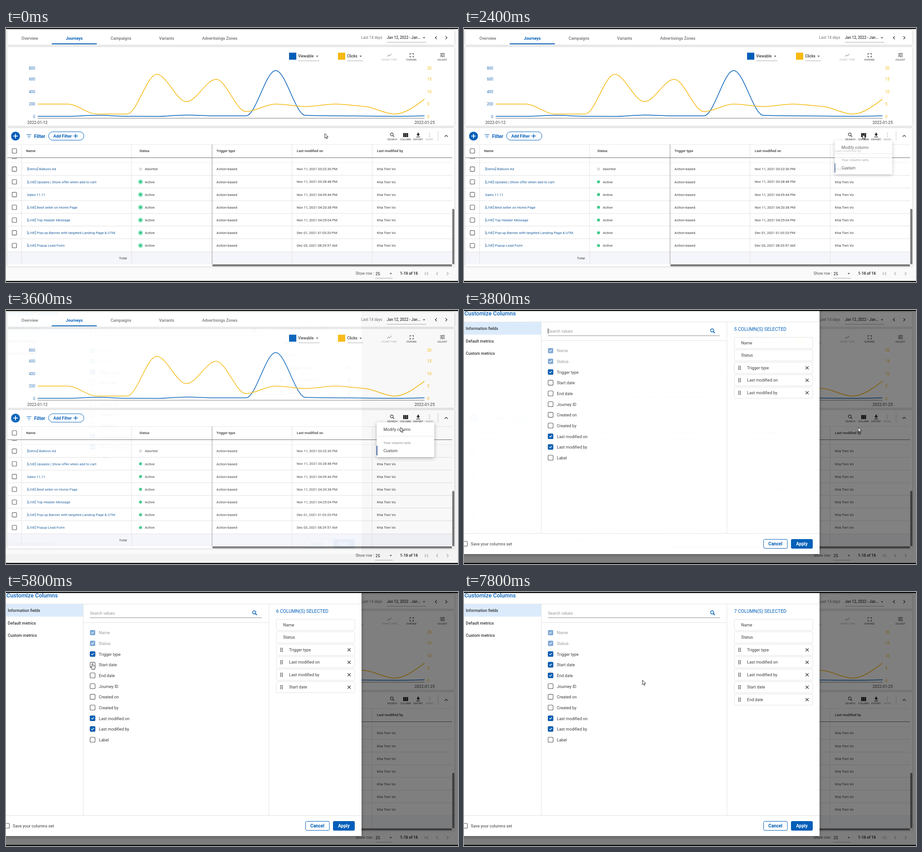
An HTML page for the animation above (8000 ms loop, 998 by 561 pixels).

```html
<!DOCTYPE html>
<html lang="en">
<head>
<meta charset="utf-8">
<title>Customize columns</title>
<style>
html, body { margin: 0; width: 100%; height: 100%; overflow: hidden; background: #fafafa; }
svg { display: block; width: 100%; height: 100%; font-family: Roboto, Arial, sans-serif; }
text { white-space: pre; }
.card { filter: drop-shadow(0 .5px 2px rgba(0,0,0,.22)); }
.pop { filter: drop-shadow(0 2px 4px rgba(0,0,0,.3)); }
.anim { animation: 8s linear infinite; }
.step { animation: 8s step-end infinite; }

.glow { animation-name: glow; transform-box: fill-box; transform-origin: center; }
.menu { animation-name: menu; transform-origin: 882px 248px; }
.modal { animation-name: modal; }
.cursor { animation-name: cursor; animation-timing-function: ease-in-out; }
.arrow { animation-name: arrow; }
.hand { animation-name: hand; }
.caret { animation-name: caret; }
.five { animation-name: five; }
.six { animation-name: six; }
.seven { animation-name: seven; }
.start { animation-name: start; }
.startTick { animation-name: startTick; }
.endTick { animation-name: endTick; }

@keyframes glow {
  0%, 14% { opacity: 1; transform: scale(1); }
  22.5% { opacity: .8; transform: scale(.86); }
  28%, 99.9% { opacity: 0; transform: scale(.6); }
  100% { opacity: 1; transform: scale(1); }
}
@keyframes menu {
  0%, 29.2% { opacity: 0; transform: scaleY(.8); }
  30% { opacity: .78; transform: scaleY(.975); }
  32%, 45.2% { opacity: 1; transform: none; }
  47.2%, 100% { opacity: 0; transform: none; }
}
@keyframes modal {
  0%, 44.8% { opacity: 0; }
  45% { opacity: .05; }
  47.4% { opacity: .98; }
  50%, 100% { opacity: 1; }
}
@keyframes cursor {
  0%, 13.75% { transform: translate(704px, 233px); }
  21.5%, 31% { transform: translate(880px, 235px); }
  42%, 48% { transform: translate(870.5px, 259px); }
  58% { transform: translate(199px, 166px); }
  62.5%, 76% { transform: translate(191px, 155.5px); }
  84%, 90% { transform: translate(191px, 180px); }
  97%, 100% { transform: translate(394px, 194.5px); }
}
@keyframes arrow { 0% { opacity: 1; } 21% { opacity: 0; } 29.5% { opacity: 1; } 58% { opacity: 0; } 91%, 100% { opacity: 1; } }
@keyframes hand { 0% { opacity: 0; } 21% { opacity: 1; } 29.5% { opacity: 0; } 58% { opacity: 1; } 91%, 100% { opacity: 0; } }
@keyframes caret { 0% { opacity: 0; } 45% { opacity: 1; } 52.9% { opacity: 0; } 59.5% { opacity: 1; } 66.2%, 100% { opacity: 0; } }
@keyframes five { 0% { opacity: 1; } 72.25%, 100% { opacity: 0; } }
@keyframes six { 0% { opacity: 0; } 72.25% { opacity: 1; } 87.25%, 100% { opacity: 0; } }
@keyframes seven { 0% { opacity: 0; } 87.25%, 100% { opacity: 1; } }
@keyframes start { 0% { opacity: 0; } 72.25%, 100% { opacity: 1; } }
@keyframes startTick { 0% { opacity: 0; } 73.25%, 100% { opacity: 1; } }
@keyframes endTick { 0% { opacity: 0; } 88.25%, 100% { opacity: 1; } }
</style>
</head>
<body>
<svg id="stage" viewBox="0 0 998 561" preserveAspectRatio="none"></svg>
<script>
const BLUE = '#005eb8', YELLOW = '#f7b90f', INK = '#3c3c3c', LINE = '#e2e2e2';

// y is the vertical centre of the capitals
const text = (x, y, s, size, fill = INK, weight = 400, anchor = 'start') =>
  `<text x="${x}" y="${y + size * .355}" font-size="${size}" fill="${fill}" font-weight="${weight}" text-anchor="${anchor}">${s.replace(/&/g, '&amp;')}</text>`;
const rect = (x, y, w, h, fill, extra = '') =>
  `<rect x="${x}" y="${y}" width="${w}" height="${h}" fill="${fill}" ${extra}/>`;
const path = (d, stroke, width = 1, extra = '') =>
  `<path d="${d}" fill="none" stroke="${stroke}" stroke-width="${width}" ${extra}/>`;
const dot = (x, y, r, fill, extra = '') =>
  `<circle cx="${x}" cy="${y}" r="${r}" fill="${fill}" ${extra}/>`;
const hline = (x1, x2, y, c = LINE, w = 1) => path(`M${x1} ${y}H${x2}`, c, w);
const vline = (x, y1, y2, c = LINE, w = 1) => path(`M${x} ${y1}V${y2}`, c, w);
const group = (cls, body, extra = '') => `<g class="${cls}" ${extra}>${body}</g>`;
const down = (x, y) => `<path d="M${x - 2.5} ${y - 1.2}h5l-2.5 2.7z" fill="#444"/>`;
const chevron = (x, y, dir, c) => path(`M${x - dir * 1.7} ${y - 3.4}l${dir * 3.4} 3.4l${-dir * 3.4} 3.4`, c, 1.3);
const lens = (x, y, r, c, w) =>
  `<circle cx="${x}" cy="${y}" r="${r}" fill="none" stroke="${c}" stroke-width="${w}"/>` +
  path(`M${x + r * .7} ${y + r * .7}l${r} ${r}`, c, w * 1.2);
const emptyBox = (x, y, s) =>
  rect(x - s / 2, y - s / 2, s, s, '#fff', 'rx="2" stroke="#555" stroke-width="1.1"');
const fullBox = (x, y, fill = BLUE) =>
  rect(x - 5.8, y - 5.8, 11.6, 11.6, fill, 'rx="2"') +
  path(`M${x - 2.8} ${y - .2}l2 2.1l3.8 -4`, '#fff', 1.3);

// Monotone cubic through evenly spaced points
function curve(ys, color) {
  const n = ys.length, x0 = 70, dx = 854 / (n - 1);
  const s = ys.slice(1).map((y, i) => (y - ys[i]) / dx);
  const m = ys.map((_, i) => {
    const a = s[i - 1], b = s[i];
    if (i === 0 || i === n - 1) return 0;
    return a * b <= 0 ? 0 : Math.sign(a) * Math.min(Math.abs(a), Math.abs(b), Math.abs(a + b) / 4);
  });
  m[0] = (3 * s[0] - m[1]) / 2;
  m[n - 1] = (3 * s[n - 2] - m[n - 2]) / 2;
  let d = `M${x0} ${ys[0]}`;
  for (let i = 1; i < n; i++) {
    const x = x0 + i * dx;
    d += `C${x - dx * 2 / 3} ${ys[i - 1] + m[i - 1] * dx / 3} ${x - dx / 3} ${ys[i] - m[i] * dx / 3} ${x} ${ys[i]}`;
  }
  return path(d, color, 1.5);
}

function header() {
  let s = rect(3, 5, 987, 32, '#fff', 'class="card"');
  [[34, 'Overview'], [231, 'Campaigns'], [338, 'Variants'], [433, 'Advertisings Zones']]
    .forEach(([x, t]) => s += text(x, 23, t, 9, '#707070', 500));
  s += text(132, 23, 'Journeys', 9, BLUE, 700) + rect(101, 34, 99.5, 2, BLUE);
  s += text(784, 21.5, 'Last 14 days', 8.3, '#777') + text(841, 21.5, 'Jan 12, 2022 - Jan...', 8.2, INK, 500);
  s += hline(841, 928, 31.5, '#aaa') + down(923, 21.7);
  return s + chevron(949.5, 21.5, -1, '#333') + chevron(972, 21.5, 1, '#333');
}

function chart() {
  let s = rect(3, 42, 987, 174, '#fff', 'class="card"');
  s += rect(625, 54.5, 16, 15.5, BLUE) + text(645, 62.3, 'Viewable', 8.4, INK, 500) + hline(645, 692, 72.5, '#aaa') + down(687, 62.5);
  s += rect(733, 54.5, 16, 15.5, YELLOW) + text(753, 62.3, 'Clicks', 8.4, INK, 500) + hline(753, 788, 72.5, '#aaa') + down(783, 62.5);
  s += path('M841.5 63.5l3.2-4 2.3 2.3 4-5', '#999', 1.1) + text(846, 69.8, 'CHART TYPE', 5.9, '#aaa', 400, 'middle');
  s += path('M892 59v-2.5h2.5M897 56.5h2.500v2.5M899.500 61.500v2.500h-2.500M894.500 64h-2.500v-2.500', '#333', 1.2) + text(895.5, 69.8, 'EXPAND', 5.9, INK, 400, 'middle');
  s += path('M958.500 56.500h5M966 56.500h3M958.500 59.700h2.500M963.500 59.700h5.500M958.500 63h4M965 63h4M964.800 54.800v3.400M961.700 58v3.400M964 61.300v3.400', '#333', 1.1) + text(963.5, 69.8, 'ADJUST', 5.9, INK, 400, 'middle');
  [89.5, 113.5, 141, 168.5, 196].forEach((y, i) => {
    s += text(64.5, y, String(800 - 200 * i), 8.4, '#2b6fb5', 400, 'end');
    s += text(930, y, String(20 - 5 * i), 8.4, YELLOW);
  });
  s += hline(70, 924, 199.3, '#777', 1.1);
  s += text(47, 208.5, '2022-01-12', 8.9) + text(902, 208.5, '2022-01-25', 8.9);
  s += curve([195, 195, 192.8, 195, 195.3, 192.3, 194, 194, 94, 193, 194, 194.6, 195, 194], BLUE);
  return s + curve([5, 5, 1, 1, 17, 6, 15, 2, 5, 4, 5, 4, 1, 7].map(v => 195.5 - 5.48 * v), YELLOW);
}

function toolbar() {
  let s = dot(21, 238.7, 9.8, BLUE) + path('M16 238.700h10M21 233.700v10', '#fff', 1.8);
  s += path('M45.500 235.500h10.500M47.500 239h6.500M49.500 242.500h2.500', BLUE, 1.2) + text(62, 238.8, 'Filter', 10.6, BLUE, 700);
  s += rect(94, 229.2, 78, 18.6, '#fff', `rx="9.3" stroke="${BLUE}"`) + text(104.5, 238.7, 'Add Filter', 9.3, BLUE, 700);
  s += path('M149 238.500h9.600M153.800 233.700v9.600', BLUE, 1.4);
  s += lens(851.8, 235, 3.1, '#333', 1.1);
  [877, 880.8, 884.6].forEach(x => s += rect(x, 232, 3.2, 9, '#222'));
  s += `<path d="M908.600 231.500h3v3.200h2.600l-4.100 4-4.100-4h2.600zM906 240h8.200v1.300h-8.200z" fill="#222"/>`;
  [232.5, 236.3, 240].forEach(y => s += dot(935, y, 1, '#b5b5b5'));
  [[853, 'SEARCH'], [882, 'COLUMN'], [910, 'EXPORT'], [935, 'MORE']]
    .forEach(([x, t], i) => s += text(x, 246, t, 5.8, i === 3 ? '#aaa' : INK, 400, 'middle'));
  return s + vline(954, 228, 249, '#ccc') + path('M968.500 240.300l3.500-3.500 3.500 3.500', '#333', 1.3);
}

function table() {
  const names = ['[Demo] Balloon Ad', '[LIVE] Upsales | Show offer when add to cart', 'Sales 11.11',
    '[LIVE] Best seller on Home Page', '[LIVE] Top Header Message',
    '[LIVE] Pop-up Banner with targeted Landing Page & UTM', '[LIVE] Popup Lead Form'];
  const dates = ['Nov 11, 2021 03:22:30 PM', 'Nov 11, 2021 03:28:48 PM', 'Nov 11, 2021 04:09:44 PM',
    'Nov 11, 2021 04:20:38 PM', 'Nov 11, 2021 04:25:04 PM', 'Dec 01, 2021 01:03:20 PM', 'Dec 03, 2021 08:29:57 AM'];
  const link = '#1b5e9e';
  let s = rect(3, 221, 987, 305.5, '#fff', 'class="card"') + toolbar();
  s += rect(3, 494, 982, 28, '#f5f6fb') + hline(3, 985, 257.5, '#e8e8e8');
  s += group('', text(46.5, 283.3, '[Demo] Popup', 7.8, link) + emptyBox(18.5, 283.5, 10), 'clip-path="url(#body)"');
  s += hline(3, 985, 297.5, '#efefef');
  names.forEach((name, i) => {
    const y = 311.6 + 28.15 * i;
    s += hline(3, 985, Math.round(y + 14) - .5) + emptyBox(18.5, y, 10) + text(46.5, y, name, 7.8, link);
    if (i) s += dot(297, y, 6, '#bdf2dc', 'class="anim glow"');
    s += dot(297, y, 3.3, i ? '#3fc98c' : '#dcdcdc') + text(306.5, y, i ? 'Active' : 'Aborted', 7.9);
    s += text(464.5, y, 'Action-based', 7.9) + text(642, y, dates[i], 7.7) + text(819, y, 'Kha Tien Vo', 7.8);
  });
  [34, 277, 631, 808].forEach(x => s += vline(x + .5, 257, 522));
  s += vline(455, 257, 522, '#c0c0c0', 1.8) + hline(3, 985, 286.5, '#6b6b6b', 1.2) + emptyBox(18.5, 271.5, 10);
  [[44.5, 'Name'], [294.5, 'Status'], [464.5, 'Trigger type'], [642, 'Last modified on'], [819, 'Last modified by']]
    .forEach(([x, t]) => s += text(x, 271.5, t, 7.75, '#333', 500));
  s += text(267, 508, 'Total', 7.8, INK, 400, 'end');
  s += rect(985.3, 399.5, 4.7, 122.5, '#7c7c7c', 'rx="2"') + rect(455.5, 522, 529.5, 4.5, '#7c7c7c', 'rx="2"');
  s += text(772, 542.5, 'Show row :', 8.4, '#555') + text(816, 542.5, '25', 8.6, INK, 500) + down(849.5, 542.5) + hline(815, 854, 552.5, '#aaa');
  s += text(870, 542.5, '1-16 of 16', 8.4, '#333', 700) + vline(925.5, 539, 546, '#aaa', 1.2);
  return s + chevron(930.5, 542.5, -1, '#aaa') + chevron(952, 542.5, -1, '#aaa') + chevron(975, 542.5, 1, '#aaa');
}

function menu() {
  return group('anim menu', rect(818.5, 248, 127, 77, '#fff', 'rx="2" class="pop"') +
    text(833.5, 264.3, 'Modify column', 9) + hline(819, 945, 278.5) +
    text(833.5, 292.8, 'Your column sets', 7.75, '#8a8a8a') +
    rect(818, 300, 2, 21, '#42629f') + text(833.5, 310.8, 'Custom', 8.9));
}

function pick(i, name, movable = true) {
  const y = 72.7 + 27.5 * i;
  let s = rect(597, y - 12.3, 173, 24.6, '#fff', `rx="3" stroke="${LINE}"`) + text(movable ? 625 : 612, y, name, 9.1);
  if (!movable) return s;
  for (let k = 0; k < 6; k++) s += rect(605.5 + 3.6 * (k % 2), y - 4.2 + 3.2 * (k >> 1), 2, 2, '#444');
  return s + path(`M754.300 ${y - 3.3}l6.600 6.600m0 -6.600l-6.600 6.600`, '#333', 1.2);
}

function modal() {
  const fields = ['Name', 'Status', 'Trigger type', 'Start date', 'End date', 'Journey ID',
    'Created on', 'Created by', 'Last modified on', 'Last modified by', 'Label'];
  let s = rect(0, 0, 998, 561, '#000', 'opacity=".5"') + rect(-10, -10, 795, 549, '#fff', 'class="pop"');
  s += text(1, 7.2, 'Customize Columns', 12.6, BLUE, 500) + hline(0, 785, 26.5);
  s += rect(0, 27, 170, 27.5, '#dbebfc');
  ['Information fields', 'Default metrics', 'Custom metrics']
    .forEach((t, i) => s += text(4, 41 + 27.4 * i, t, 9, '#333', 500));
  s += vline(170.5, 27, 493) + vline(580.5, 27, 493) + hline(171, 580, 67.5) + hline(0, 785, 493.5);
  s += text(185.5, 47, 'Search values', 8.9, '#999') + hline(185, 565, 56.8, '#888') + lens(548, 45, 3.5, BLUE, 1.5);
  s += rect(185.2, 40.5, 1, 12, '#222', 'class="step caret"');
  fields.forEach((f, i) => {
    const y = 89.7 + 23.65 * i, locked = i < 2;
    s += locked ? fullBox(191.2, y, '#7fa8d6') : emptyBox(191.2, y, 11);
    if (i === 2 || i === 8 || i === 9) s += fullBox(191.2, y);
    if (i === 3 || i === 4) s += group(i === 3 ? 'step startTick' : 'step endTick', fullBox(191.2, y));
    s += text(205, y + .4, f, 9.1, locked ? '#999' : INK);
  });
  ['five', 'six', 'seven'].forEach((c, i) =>
    s += group('step ' + c, text(596.5, 42.5, `${5 + i} COLUMN(S) SELECTED`, 10.35, BLUE)));
  s += pick(0, 'Name', false) + pick(1, 'Status', false);
  s += pick(2, 'Trigger type') + pick(3, 'Last modified on') + pick(4, 'Last modified by');
  s += group('step start', pick(5, 'Start date')) + group('step seven', pick(6, 'End date'));
  s += emptyBox(2.2, 516.3, 10.5) + text(15, 516.7, 'Save your columns set', 9.1);
  s += rect(661.5, 506.5, 52.5, 20, '#fff', `rx="3" stroke="${BLUE}"`) + text(687.5, 516.5, 'Cancel', 10, BLUE, 700, 'middle');
  s += rect(722, 506, 48, 21, BLUE, 'rx="3"') + text(746, 516.5, 'Apply', 10, '#fff', 700, 'middle');
  return group('anim modal', s);
}

function cursor() {
  const look = 'fill="#fff" stroke="#111" stroke-width=".9" stroke-linejoin="round"';
  return group('anim cursor',
    group('step arrow', `<path d="M0 0V10.300L2.400 8.200 4 11.800 5.600 11.100 4.100 7.600H7.200Z" ${look}/>`) +
    group('step hand', `<path d="M-1.200 3.200a1.200 1.200 0 0 1 2.400 0V7L5 7.800Q6.300 8.200 6 10L5 15H-1.500L-4 11Q-4.400 9.600-3 9.800L-1.200 11Z" ${look}/>`));
}

document.getElementById('stage').innerHTML =
  '<clipPath id="body"><rect x="0" y="287" width="998" height="235"/></clipPath>' +
  rect(0, 0, 998, 561, '#fafafa') + header() + chart() + table() + modal() + menu() +
  rect(0, 0, 998, 2.2, '#000') + rect(0, 558.7, 998, 2.3, '#000') + cursor();
</script>
</body>
</html>
```
